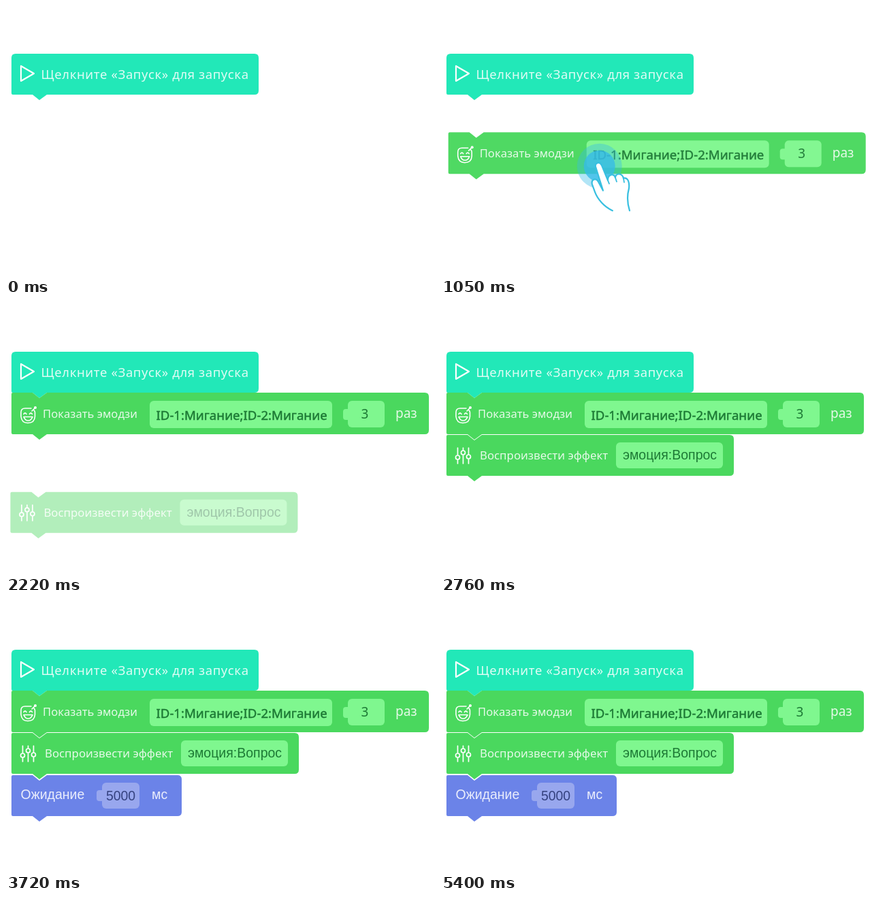
Recreate the animation shown at these times as an HTML page. Size 630 by 396 pixels, loop 5430 ms.

```html
<!DOCTYPE html>
<html lang="ru">
<head>
<meta charset="utf-8">
<style>
  html, body { margin: 0; width: 100%; height: 100%; overflow: hidden; background: #fff; }
  svg { display: block; width: 630px; height: 396px; }
  text { font-family: "Noto Sans", "Open Sans", sans-serif; fill: #fff; white-space: pre; }
  .arial { font-family: "Liberation Sans", Arial, sans-serif; }
  .line { fill: none; stroke: #fff; stroke-linecap: round; stroke-linejoin: round; }
</style>
</head>
<body>
<svg id="stage" viewBox="0 0 630 396" xmlns="http://www.w3.org/2000/svg"></svg>
<script>
const LOOP = 5430, STEP = 30;
const stage = document.getElementById("stage");

// Block outline: optional notch on top, connector tip below.
function block(y, right, height, color, notch = true) {
  const bottom = y + height;
  const top = notch ? `M8 ${y + 2}q0 -2 2 -2H39l10 8 11 -8` : `M8 ${y + 6}q0 -6 6 -6`;
  return `<path fill="${color}" d="${top}H${right - 6}q6 0 6 6V${bottom - 6}q0 6 -6 6H60l-11 8 -10 -8H10q-2 0 -2 -2Z"/>`;
}
const field = (x, y, w, h, color) =>
  `<rect x="${x}" y="${y}" width="${w}" height="${h}" rx="6" fill="${color}"/>`;
const knob = (x, y, color) =>
  `<rect x="${x}" y="${y}" width="12" height="16" rx="4" fill="${color}"/>`;
const text = (x, y, size, value, extra = "") =>
  `<text x="${x}" y="${y}" font-size="${size}" ${extra}>${value}</text>`;
const line = (d, width) => `<path class="line" stroke-width="${width}" d="${d}"/>`;
const slider = (x, y) =>
  line(`M${x} 211V${y - 3}M${x} ${y + 3}V234M${x - 3} ${y}a3 3 0 1 0 6 0a3 3 0 1 0 -6 0`, 1.7);

const GREEN = "#4ad85e", MINT = "#7ff78f", BLUE = "#6b83e8", PALE = "#98a7ee";
const ink = 'style="fill:#1d7a35"';
const soft = 'fill-opacity=".86"';

const startBlock = block(70, 371, 60, "#22e8b8", false)
  + line("M22 88V110L41 99Z", 2.2)
  + text(51.5, 107, 18.5, "Щелкните «Запуск» для запуска", `letter-spacing=".58" ${soft}`);

const emojiBlock = block(130, 621, 61, GREEN)
  + line("M37 153H28Q22 153 22 159V165Q23 174.5 32 174.5Q42 174.5 42.5 165V159Q42.5 157 41 156M38 157L43 152", 1.6)
  + line("M26 161.5q2 -3.2 4 0M34.5 161.5q2 -3.2 4 0M26 165.5H39Q37 171 32.5 171Q28 171 26 165.5Z", 1.6)
  + `<circle cx="43" cy="152" r="2" fill="#fff"/>`
  + text(54, 167, 16.6, "Показать эмодзи", soft)
  + field(211, 142, 268, 40, MINT)
  + text(220.5, 169.5, 18.6, "ID-1:Мигание;ID-2:Мигание", `style="fill:#1d7a35;stroke:#1d7a35;stroke-width:.45"`)
  + knob(495, 154, MINT) + field(502, 142, 54, 39, MINT)
  + text(527, 168, 19, "3", `text-anchor="middle" ${ink}`)
  + text(572, 167, 19, "раз", soft);

const effectBlock = block(192, 430, 60, GREEN)
  + slider(24.5, 225) + slider(32.5, 218) + slider(40.5, 224)
  + text(57, 228, 16.8, "Воспроизвести эффект", soft)
  + field(257, 203, 157, 38, MINT)
  + text(267, 228, 19.5, "эмоция:Вопрос", `class="arial" ${ink}`);

const waitBlock = block(254, 258, 60, BLUE)
  + text(21.5, 289, 19.5, "Ожидание", `class="arial" ${soft}`)
  + knob(133, 276, PALE) + field(141, 265, 55, 38, PALE)
  + text(147, 290.5, 19.4, "5000", `class="arial" style="fill:#35427f"`)
  + text(214, 289, 19.5, "мс", `class="arial" ${soft}`);

// Hand coordinates are relative to the fingertip.
const hand = `<g id="halo" fill="#36bce8"><circle r="33" opacity=".38"/><circle r="23" opacity=".78"/></g>
  <path fill="#fff" stroke="#38bfe0" stroke-width="2.2" stroke-linejoin="round" stroke-linecap="round"
   d="M21 68.5C9 63 -1 52 -5 41L-9 30C-11 22 -3 20 0 26L7 39L-4 4C-5 -2 2 -4 5 2L14 24
      C14 15 23 13 25 20C26 13 35 13 37 21C44 19 46 28 45 36C42 47 42 56 46 68.5"/>
  <path fill="none" stroke="#38bfe0" stroke-width="1.8" stroke-linecap="round" d="M14 24L16 29M25 20L27 26M37 21L38 27"/>`;

stage.innerHTML = `<g>${startBlock}</g><g id="emoji">${emojiBlock}</g>
  <g id="effect">${effectBlock}</g><g id="wait">${waitBlock}</g><g id="hand">${hand}</g>`;
const part = id => document.getElementById(id);

const progress = (t, from, to) => Math.min(1, Math.max(0, (t - from) / (to - from)));
const ease = u => (1 - Math.cos(Math.PI * u)) / 2;

function place(id, x, y, opacity) {
  const node = part(id);
  node.setAttribute("transform", `translate(${x.toFixed(2)} ${y.toFixed(2)})`);
  node.setAttribute("opacity", opacity.toFixed(3));
}

function draw(t) {
  const left = 1 - ease(progress(t, 680, 1300));
  place("emoji", 7.8 * left, 157.5 * left, progress(t, 420, 1070));
  place("hand", 211 + 57 * left, 180 + 147.4 * left,
    progress(t, 400, 700) * (1 - progress(t, 1480, 1700)));
  place("halo", 5 * left, 9 * left, 1);

  const effect = progress(t, 1960, 2580), effectLeft = 1 - ease(effect);
  place("effect", -2.5 * effectLeft, 134 * effectLeft, effect);

  const wait = progress(t, 2790, 3410), waitLeft = 1 - ease(wait);
  place("wait", -1 * waitLeft, 110 * waitLeft, wait);
}

const began = performance.now();
function tick() {
  const t = (performance.now() - began) % LOOP;
  draw(Math.floor(t / STEP) * STEP);
  requestAnimationFrame(tick);
}
draw(0);
requestAnimationFrame(tick);
</script>
</body>
</html>
```
